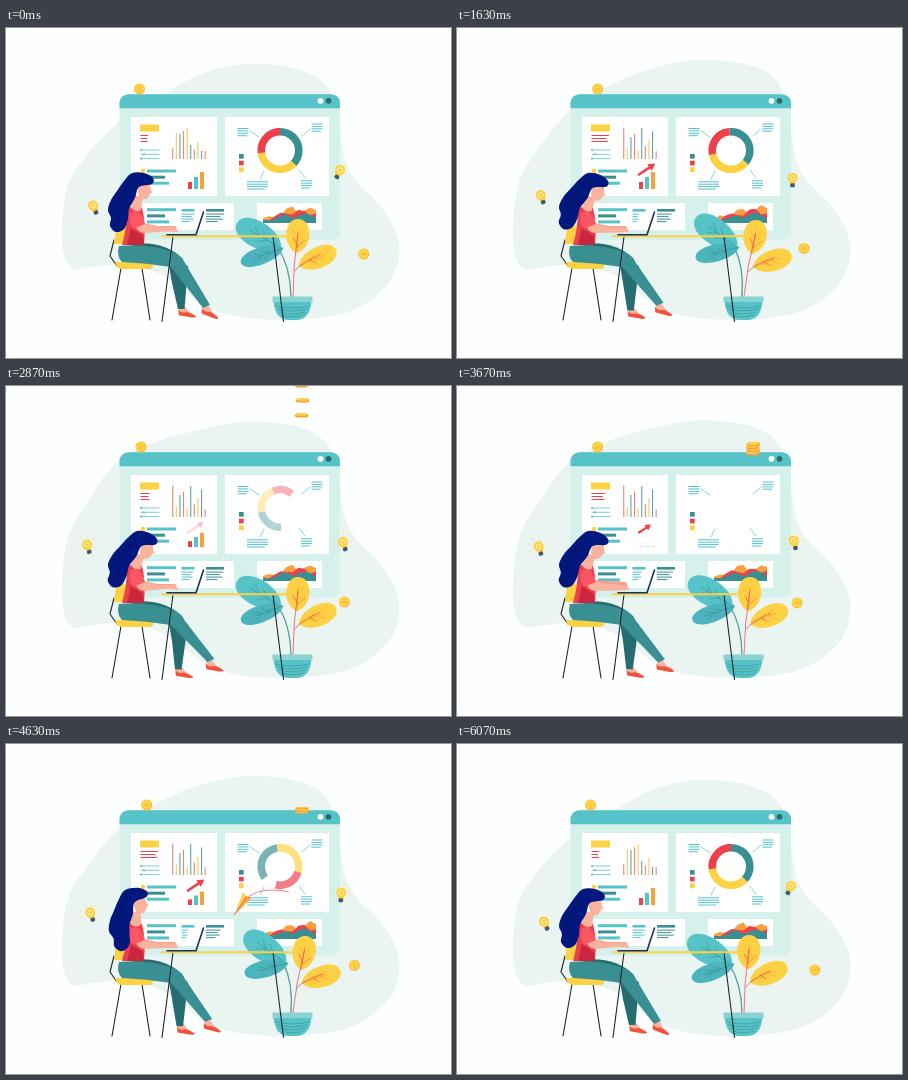
These frames come from a looping animation (445 px wide and 330 px high, 6.11 s). An HTML page with a canvas:

```html
<!DOCTYPE html>
<html lang="en">
<head>
<meta charset="utf-8">
<title>Analytics dashboard</title>
<style>
html, body { margin: 0; width: 100%; height: 100%; overflow: hidden; background: #fdfffe; }
canvas { display: block; width: 445px; height: 330px; }
</style>
</head>
<body>
<canvas id="stage" width="445" height="330"></canvas>
<script>
const g = document.getElementById('stage').getContext('2d');
const LOOP = 6110, HALF = LOOP / 2, TAU = Math.PI * 2, DEG = Math.PI / 180;
const { sin, cos, min, max, abs, exp, hypot, atan2 } = Math;
const C = {
  teal: '#56c3c8', deep: '#3a8f93', dark: '#256d70', red: '#ee3f4c', yellow: '#fdd144',
  orange: '#f7a03c', skin: '#f9b29d', navy: '#03187f', ink: '#1c2430', mint: '#d6f0eb'
};

const lerp = (a, b, k) => a + (b - a) * k;
const clamp = k => max(0, min(1, k));
const ease = k => k * k * (3 - 2 * k);
const ramp = (t, from, to) => clamp((t - from) / (to - from));
const step = (t, from, to) => ease(ramp(t, from, to));

function rect(x, y, w, h, color, r = 0) {
  g.fillStyle = color;
  g.beginPath();
  g.roundRect(x, y, w, h, r);
  g.fill();
}
function oval(x, y, rx, ry, color, turn = 0) {
  g.fillStyle = color;
  g.beginPath();
  g.ellipse(x, y, rx, ry, turn, 0, TAU);
  g.fill();
}
function line(pts, color, w = 1) {
  g.strokeStyle = color;
  g.lineWidth = w;
  g.lineCap = g.lineJoin = 'round';
  g.beginPath();
  pts.forEach(p => g.lineTo(...p));
  g.stroke();
}
function poly(pts, color) {
  g.fillStyle = color;
  g.beginPath();
  pts.forEach(p => g.lineTo(...p));
  g.fill();
}
// Closed smooth curve through the points
function smooth(pts, color) {
  const n = pts.length, at = i => pts[(i + n) % n];
  g.fillStyle = color;
  g.beginPath();
  g.moveTo(...pts[0]);
  for (let i = 0; i < n; i++) {
    const [a, b, c, d] = [at(i - 1), at(i), at(i + 1), at(i + 2)];
    g.bezierCurveTo(b[0] + (c[0] - a[0]) / 6, b[1] + (c[1] - a[1]) / 6,
      c[0] - (d[0] - b[0]) / 6, c[1] - (d[1] - b[1]) / 6, c[0], c[1]);
  }
  g.fill();
}
function path(d, color, w) {
  const p = new Path2D(d);
  if (w) {
    g.strokeStyle = color; g.lineWidth = w; g.lineCap = 'round'; g.stroke(p);
  } else {
    g.fillStyle = color; g.fill(p);
  }
}
function place(x, y, turn, draw) {
  g.save();
  g.translate(x, y);
  g.rotate(turn);
  draw();
  g.restore();
}
function pivot(x, y, turn, draw) {
  place(x, y, turn, () => { g.translate(-x, -y); draw(); });
}

const outline = [[88, 239], [65, 240], [56, 212], [61, 160], [81, 127], [112, 95], [150, 71], [195, 46],
  [240, 36], [288, 40], [318, 55], [332, 82], [336, 118], [347, 149], [376, 180], [393, 215],
  [385, 252], [350, 281], [300, 291], [240, 290], [200, 278], [160, 249], [122, 237]];

// The upper left swells once per loop, the crown rises twice
function blob(t, m) {
  const crown = 4 * sin(TAU * t / LOOP) ** 2;
  smooth(outline.map(([x, y]) => {
    const swell = y < 170 ? 21 * m * exp(-(((x - 122) / 50) ** 2)) : 0;
    return [x, y - swell - (y < 75 ? crown : 0)];
  }), '#eaf5f1');
}

function textLines(x, y, widths, gap, color) {
  widths.forEach((w, i) => rect(x, y + i * gap, w, 1, color));
}
function bullets(x, y, pulse) {
  rect(x, y, 29, 3, C.teal);
  rect(x, y + 6.2, 18, 3, C.deep);
  rect(x, y + 12.2, 22, 3, C.teal);
}

function barPanel(t, pulse) {
  rect(125, 89, 86, 79, '#fff');
  rect(134, 96.5, 19, 7, C.yellow);
  const w = 7.5 + 10 * pulse;
  textLines(134.5, 107, [w, w * 0.85, w * 0.95], 3, C.red);
  for (let i = 0; i < 3; i++) {
    const y = 122 + i * 4.3;
    line([[135, y], [153, y]], C.teal, 0.8);
    oval(i === 1 ? 138 : 135, y, 1.1, 1.1, C.teal);
  }

  const busy = step(t, 0, 1500) - step(t, 4800, 6000);
  const hues = ['#e8847a', '#f6c95c', '#5fa5a5'];
  for (let i = 0; i < 10; i++) {
    const calm = 8 + 20 * exp(-(((i - 2.8) / 2) ** 2)) + (i % 3 === 1 ? 9 : 0);
    const h = lerp(calm, 19.5 + 12 * cos(2.46 * i), busy);
    rect(166.2 + i * 3.6, 131 - h, 1.1, h, hues[i % 3]);
  }

  oval(137, 143, 2.3, 2.3, C.yellow);
  bullets(141, 141.5);
  const grow = 1 - step(t, 2700, 3350) + step(t, 3500, 5100);
  [C.red, C.teal, C.orange].forEach((c, i) => {
    const h = (7 + 5 * i) * grow;
    rect(182 + i * 6, 161 - h, 4, h, c);
  });

  const u = t % HALF, k = step(u, 420, 720);
  if (k > 0) {
    g.globalAlpha = 1 - ramp(u, 2560, 2940);
    const x = lerp(182, 195, k), y = lerp(147, 137.8, k), s = 0.3 + 0.7 * k;
    line([[182, 146.5], [x, y]], C.red, 2.6 * s);
    place(x, y, -0.6, () => poly([[4 * s, 0], [-3 * s, -4 * s], [-3 * s, 4 * s]], C.red));
    g.globalAlpha = 1;
  }
}

function donutPanel(t) {
  rect(219, 89, 104, 79, '#fff');
  [[231.5, 100, 11], [305.5, 95.5, 11], [241, 153.3, 21], [295, 152.3, 11]]
    .forEach(([x, y, w]) => textLines(x, y, [w, w, w, w * 0.85], 2.4, C.teal));
  [[244, 103, 253, 109], [304, 101, 296, 108], [254, 151, 258, 143], [299, 150, 293, 142]]
    .forEach(([a, b, c, d]) => line([[a, b], [c, d]], C.teal, 0.7));
  [C.deep, C.red, C.yellow].forEach((c, i) => rect(233, 126 + i * 6.7, 4.7, 4.7, c));

  // Unwinds while fading, then winds up again
  const k = t < 3600 ? ramp(t, 1600, 3300) : ramp(t, 5250, 4050);
  let a = (-90 - 245 * k) * DEG;
  const span = TAU * (1 - k ** 3.3);
  g.globalAlpha = 1 - k ** 1.7;
  g.lineCap = 'butt';
  g.lineWidth = 7.6;
  [[C.deep, 0.37], [C.yellow, 0.36], [C.red, 0.27]].forEach(([c, part]) => {
    g.strokeStyle = c;
    g.beginPath();
    g.arc(274, 122.5, 18.8, a, a += span * part);
    g.stroke();
  });
  g.globalAlpha = 1;
}

function lowerPanels(t, pulse) {
  rect(125, 175, 103, 27, '#fff');
  bullets(141, 180.2);
  [[175.5, 13, C.teal, 0.5], [200, 18, C.deep, 0.2]].forEach(([x, w, c, cut]) => {
    const k = w * (1 - cut * pulse);
    rect(x, 181, w, 2.6, c);
    textLines(x, 185.6, [k, k * 0.8, k * 0.95, k * 0.65], 2.5, c);
  });

  rect(251, 175, 65, 27, '#fff');
  [[C.yellow, 13, 0.4], [C.orange, 18, 2.1], [C.red, 15, 3.9], [C.deep, 11, 1.2]].forEach(([c, high, phase], n) => {
    const pts = [[257, 195]];
    for (let i = 0; i < 10; i++) {
      const wave = 0.4 + 0.6 * abs(sin(i * 2.3 + phase));
      const sway = 0.92 + 0.08 * cos(2 * TAU * t / LOOP + i + n);
      pts.push([257 + i * 53 / 9, 195 - high * wave * sway * min(1, 0.3 + i / 7)]);
    }
    poly([...pts, [310, 195]], c);
  });
}

function board(t, pulse) {
  rect(113.5, 66.2, 220.5, 145.5, C.mint, [9, 9, 8, 8]);
  rect(113.5, 66.2, 220.5, 14, C.teal, [9, 9, 0, 0]);
  oval(314.5, 72.8, 2.9, 2.9, '#fff');
  oval(322.5, 72.8, 2.9, 2.9, C.dark);
  barPanel(t, pulse);
  donutPanel(t);
  lowerPanels(t, pulse);
}

function coin(x, y, turn) {
  oval(x, y, 5.5, 5.5, '#f9b63e');
  oval(x - 0.4, y - 0.3, 4.9, 4.9, C.yellow);
  place(x, y, turn, () => line([[0, -2], [0, 2]], '#f9b838', 1.3));
}
function stack(t) {
  if (t < 2650 || t > 5000) return;
  place(296, 69.5, 0, () => {
    g.scale(1, 1 - step(t, 4250, 5000));
    for (let i = 0; i < 4; i++) {
      const x = i % 2 - 0.5, y = min(-2.4 - 3 * i, -40.5 - 15 * i + 0.2 * (t - 2870));
      rect(x - 6.7, y - 1.8, 13.4, 4, C.orange, 2);
      oval(x, y - 0.7, 6.7, 1.5, C.yellow);
    }
  });
}

function bulb(x, y, turn, t) {
  place(x, y, turn, () => {
    const p = t / (LOOP / 7) % 1;
    g.globalAlpha = 0.6 * ramp(p, 0.1, 0.2) * ramp(p, 0.72, 0.62);
    for (let i = 1; i <= 8; i++) {
      const a = TAU * (0.25 + i / 9);
      line([8, 10.5].map(r => [cos(a) * r, sin(a) * r]), C.yellow, 0.6);
    }
    g.globalAlpha = 1;
    poly([[-4.5, 2], [4.5, 2], [2.3, 6], [-2.3, 6]], C.yellow);
    oval(0, 0, 5.1, 5.1, C.yellow);
    path('M-2.3 0A2.3 2.3 0 1 1 2.3 0A2.3 2.3 0 1 1 -2.3 0', '#fff2bd', 0.9);
    rect(-2.3, 5.6, 4.6, 4, '#40586b', 1.4);
  });
}

function leaf(bx, by, tx, ty, w, color, vein) {
  const len = hypot(tx - bx, ty - by), side = w * 0.67;
  place(bx, by, atan2(ty - by, tx - bx), () => {
    g.fillStyle = color;
    g.beginPath();
    g.moveTo(0, 0);
    g.bezierCurveTo(len * 0.15, -side, len, -side, len, 0);
    g.bezierCurveTo(len, side, len * 0.15, side, 0, 0);
    g.fill();
    line([[0, 0], [len * 0.7, 0]], vein, 0.6);
    for (const k of [0.3, 0.48]) for (const s of [-1, 1])
      line([[len * k, 0], [len * (k + 0.17), s * w * 0.22]], vein, 0.5);
  });
}

function plant(t) {
  pivot(286, 268, 6 * DEG * sin(Math.PI * t / HALF) ** 4, () => {
    path('M285 269Q285 240 272 219M285 269Q284 237 272 221', C.deep, 0.7);
    leaf(275, 220, 231, 195, 26, C.teal, C.deep);
    leaf(277, 220, 235, 235, 17, '#4cb4bd', C.deep);
    leaf(291, 225, 292.5, 191, 23, C.yellow, C.orange);
    leaf(293, 238, 330, 222, 21, C.yellow, C.orange);
    path('M287 269Q287 238 292 205M289 243Q294 235 313 227', C.red, 0.7);
    path('M291 217L287 210M291 219L299 212M303 231L309 235', C.red, 0.5);
  });
  path('M267.5 273H305.5Q304 292 290 292H283Q269 292 267.5 273Z', C.teal);
  for (let i = 0; i < 4; i++)
    path(`M${270 + i * 2} ${278 + i * 3}Q286 ${282 + i * 3} ${303 - i * 2} ${278 + i * 3}`, C.deep, 0.6);
  rect(266.5, 268.5, 40, 5.5, '#8ad3d0');
}

function shoe(x, y, turn) {
  place(x, y, turn, () => {
    path('M-8 -6H-2L4 1H-8Z', C.skin);
    path('M-9 -3Q-6 1 -1 -1Q4 -1 9.5 3Q9 4.5 5 4.2L-8 2.6Z', '#f2513e');
  });
}

const hair = [[147, 150], [138, 145], [126, 145], [118, 153], [111, 163], [105, 172], [102, 182], [105, 190],
  [104, 198], [110, 204], [118, 201], [122, 191], [123, 181], [129, 170], [133, 159], [146, 156]];

function head(t) {
  const lean = 8 * step(t, 0, 500) - 20 * step(t, 3900, 4450) + 12 * step(t, 5300, 5950);
  pivot(128, 180, lean * DEG, () => {
    path('M126 168L137 168L135 182Q130 185 125 180Z', C.skin);
    oval(138.3, 162.5, 6.4, 9, C.skin, 0.1);
    path('M143.5 160L146.5 164.5L143 166Z', C.skin);
    smooth(hair, C.navy);
    path('M128 151Q116 164 115 178T112 198M122 158Q110 172 109 186', '#06105c', 0.7);
  });
}

function woman(t, m) {
  // chair
  line([[115, 240], [106, 292]], C.ink, 1.1);
  line([[136, 240], [144, 292]], C.ink, 1.1);
  line([[108, 212], [104, 228], [111, 238]], C.ink, 1.1);
  path('M110 199Q117 196 122 200L120 216H108Z', C.yellow);
  path('M109 234H143Q148 235 147 239Q146 241 142 241H116Q110 241 109 234Z', C.yellow);

  // legs, feet tapping in opposite directions
  const fx = -3 * m, fy = 2.5 * m, nx = 4.5 * m, ny = -4 * m;
  shoe(181 + fx, 285 + fy, 0.05);
  poly([[162, 232], [182, 238], [178.5 + fx, 281 + fy], [172 + fx, 281 + fy], [166, 255]], C.dark);
  shoe(204 + nx, 285 + ny, 0.25 - 0.2 * m);
  path('M125 216Q158 212 177 231L140 234Z', C.dark);
  path(`M113 218Q142 215 167 224Q176 228 179 235L${204 + nx} ${277 + ny}L${197 + nx} ${280 + ny}L165 239Q140 235 116 234Q110 228 113 218Z`, C.deep);

  // body
  const type = sin(TAU * 12 * t / LOOP), lift = step(t, 3100, 3600) - step(t, 3900, 4350);
  path(`M132 194L152 ${198 - 3 * lift}L169 ${198 - 2 * lift}L171 ${201 + type}L150 ${203 - 3 * lift}Z`, '#f3a18c');
  path('M121 181Q130 175 136 180Q140 195 138 217H116Q121 200 121 181Z', C.red);
  path('M125 200L137 208L138 217H121Z', '#c9273d');
  head(t);
  path(`M128 194L137 191L140 197L154 ${199 - lift}L167 ${199 + type * 0.5}Q173 202 172 204L162 ${203.5 + type}L138 205Q130 204 128 194Z`, C.skin);
  path('M124 185Q131 180 135 187L139 196L127 201Q122 194 124 185Z', '#fb5664');
}

function desk() {
  line([[167, 208.5], [156, 293.5]], C.ink, 1.1);
  line([[267, 208.5], [277.5, 293.5]], C.ink, 1.1);
  rect(155, 207.2, 136, 2.1, C.yellow, 1);
  line([[161, 206.8], [190, 206.8], [197.5, 184]], '#17305c', 1.6);
}

const legs = [
  [[283, 148], [255, 142], [236, 150], [230, 172]],
  [[230, 172], [222, 205], [300, 195], [480, 110]]
];
function along(u) {
  const leg = legs[u < 1 ? 0 : 1], k = u < 1 ? u : u - 1, q = 1 - k;
  return [0, 1].map(n =>
    q ** 3 * leg[0][n] + 3 * q * q * k * leg[1][n] + 3 * q * k * k * leg[2][n] + k ** 3 * leg[3][n]);
}
function plane(t) {
  if (t < 4300 || t > 5500) return;
  const u = ramp(t, 4300, 4710) + ramp(t, 4710, 5140), tail = max(0, u - 0.8) + ramp(t, 5140, 5500) * 0.8;
  const trail = [];
  for (let i = 0; i <= 30; i++) trail.push(along(lerp(tail, u, i / 30)));
  line(trail, C.red, 0.7);
  const [x, y] = along(u), [px, py] = along(u - 0.02), [qx, qy] = along(u + 0.02);
  place(x, y, atan2(qy - py, qx - px), () => {
    const size = ramp(t, 4300, 4450);
    g.scale(size, size);
    poly([[12, 0], [-12, -5], [-10, 0]], C.orange);
    poly([[12, 0], [-10, 0], [-12, 5]], C.yellow);
    line([[12, 0], [-10, 0]], C.red, 0.6);
  });
}

function draw(t) {
  const c = cos(TAU * t / LOOP), m = (1 - c) / 2, pulse = sin(Math.PI * (t % HALF) / HALF);
  rect(0, 0, 445, 330, '#fdfffe');
  blob(t, m);
  board(t, pulse);

  const roll = 7.2 * ease(clamp(1.6 * pulse));
  coin(133.5 + roll, 61, roll / 5.5);
  coin(348 + 9.8 * c, 221 + 5 * c, c * 1.5);
  stack(t);
  bulb(84 + 3 * c, 168 + 9.5 * c, -0.35 - 0.06 * c, t);
  bulb(335.5 - 1.5 * c, 149 - 7 * c, 0.06 + 0.37 * c, t);

  plant(t);
  woman(t, m);
  desk();
  plane(t);
}

function tick() {
  draw(performance.now() % LOOP);
  requestAnimationFrame(tick);
}
tick();
</script>
</body>
</html>
```
